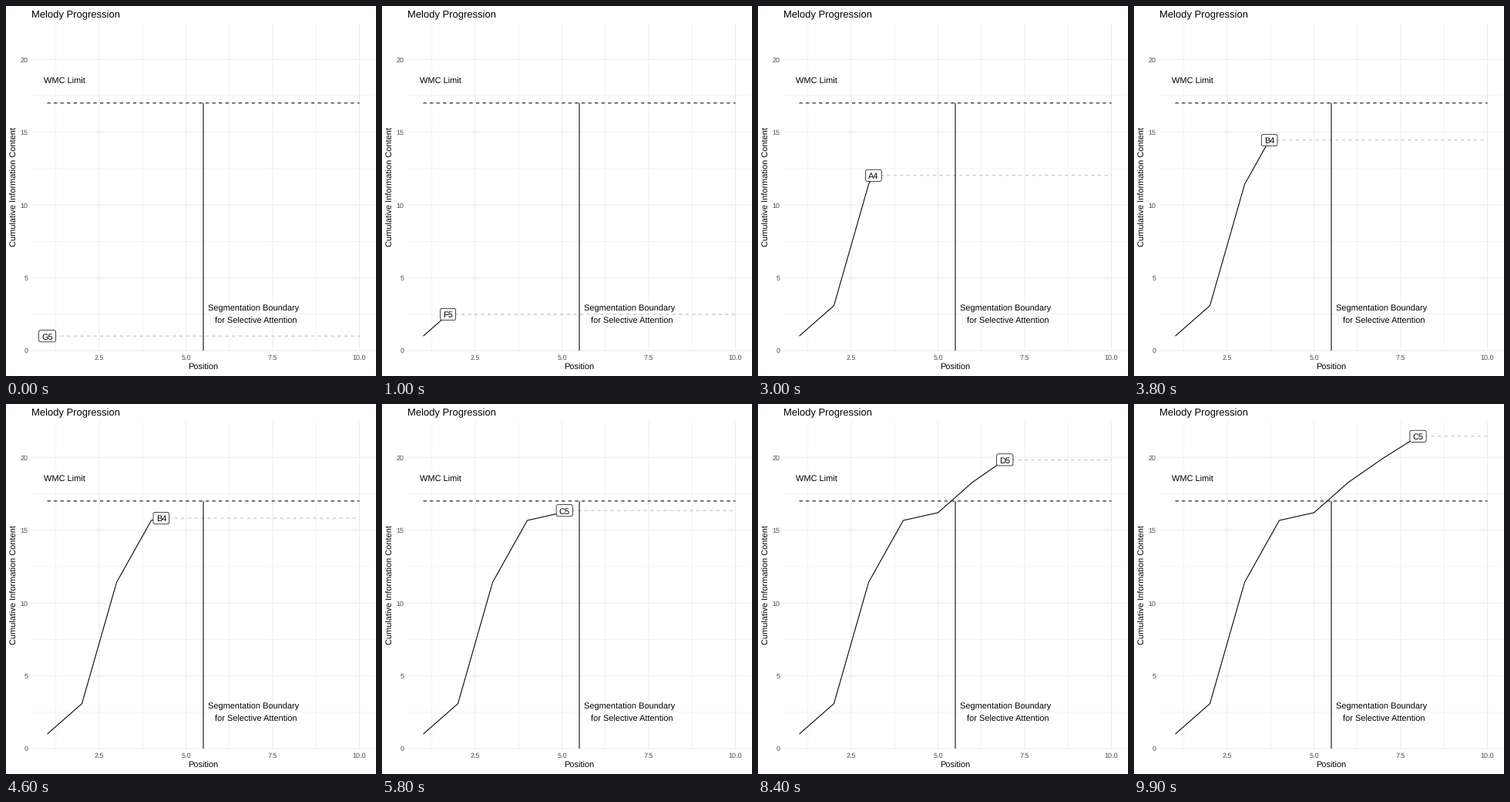
A matplotlib script that plays this animation: 480x480 px, repeating every 10 s.

```python
import numpy as np
import matplotlib.pyplot as plt
from matplotlib.animation import FuncAnimation
from matplotlib.patches import FancyBboxPatch

plt.rcParams.update({
    "font.family": "Liberation Sans",
    "text.hinting": "none",
    "lines.solid_capstyle": "butt",
    "lines.dash_capstyle": "butt",
})

SIZE, DPI = 480, 72  # at 72 dpi one point is one pixel
FRAMES, INTERVAL = 100, 100
LEFT, RIGHT, TOP, BOTTOM = 33.2, 478.8, 22.8, 447.1
LINE = 1.07
DASH = (0, (4, 4))

NOTES = ["G5", "F5", "A4", "B4", "C5", "E5", "D5", "C5"]
POSITIONS = np.arange(1, 9)
CONTENT = np.array([1, 3.09, 11.42, 15.67, 16.2, 18.3, 19.95, 21.45])
GLYPH_WIDTH = {"A": 7.34, "B": 7.34, "C": 7.94, "D": 7.94,
               "E": 7.34, "F": 6.72, "G": 8.56}


def px(v):
    return 8.5 + 45 * v


def py(v):
    return BOTTOM - 18.895 * v


fig = plt.figure(figsize=(SIZE / DPI, SIZE / DPI), dpi=DPI, facecolor="white")
ax = fig.add_axes([0, 0, 1, 1])
ax.set(xlim=(0, SIZE), ylim=(SIZE, 0))
ax.axis("off")


def line(xs, ys, z, color="black", width=LINE, style="-"):
    return ax.plot(xs, ys, color=color, lw=width, ls=style, zorder=z,
                   snap=False)[0]


def text(x, y, s, size=11, ha="center", color="black", z=6, **kw):
    return ax.text(x, y, s, size=size, ha=ha, va="baseline", color=color,
                   zorder=z, **kw)


def grid(xs, ys, z, width):
    for v in xs:
        line([px(v)] * 2, [TOP, BOTTOM], z, "#ebebeb", width)
    for v in ys:
        line([LEFT, RIGHT], [py(v)] * 2, z, "#ebebeb", width)


x_ticks = np.arange(2.5, 10.1, 2.5)
y_ticks = np.arange(0, 21, 5)
grid(x_ticks - 1.25, y_ticks[:-1] + 2.5, 0, LINE / 2)
grid(x_ticks, y_ticks, 1, LINE)

for v in x_ticks:
    text(px(v), 459, f"{v:.1f}", 9, color="#4d4d4d")
for v in y_ticks:
    text(28.6, py(v) + 3.3, str(v), 9, "right", "#4d4d4d")

text(LEFT, 15, "Melody Progression", 13, "left")
text(255.3, 472, "Position")
text(13.5, 235, "Cumulative Information Content", rotation=90,
     rotation_mode="anchor")

# Fixed annotations
line([px(1), px(10)], [py(17)] * 2, 5, style=DASH)
line([px(5.5)] * 2, [py(17), py(0)], 5)
text(76, 100.4, "WMC Limit")
text(321.5, 396, "Segmentation Boundary")
text(324.3, 412, "for Selective Attention")

# Moving parts
trail = line([], [], 2)
guide = line([], [], 2.5, "#bebebe", style=DASH)
box = FancyBboxPatch((0, 0), 22, 15.2, boxstyle="round,pad=0,rounding_size=2.4",
                     fc="white", ec="black", lw=0.71, zorder=3, snap=False)
ax.add_patch(box)
note = text(0, 0, "", z=4)


def update(i):
    # The reveal pauses for one step at its midpoint, where the note switches.
    second_half = i >= FRAMES // 2
    pos = 1 + 7 * (i - second_half) / (FRAMES - 2)
    value = np.interp(pos, POSITIONS, CONTENT)
    x, y = px(pos), py(value)

    passed = POSITIONS < pos
    trail.set_data(px(np.append(POSITIONS[passed], pos)),
                   py(np.append(CONTENT[passed], value)))
    guide.set_data([x, px(10)], [y, y])

    shift = 1e-6 if second_half else -1e-6
    name = NOTES[int(np.floor(pos + 0.5 + shift)) - 1]
    width = GLYPH_WIDTH[name[0]] + 6.12 + 7.2
    box.set_bounds(x - width / 2, y - 7.6, width, 15.2)
    note.set_text(name)
    note.set_position((x, y + 4.3))
    return trail, guide, box, note


anim = FuncAnimation(fig, update, frames=FRAMES, init_func=lambda: update(0),
                     interval=INTERVAL, repeat=True, repeat_delay=0)
plt.show()
```
